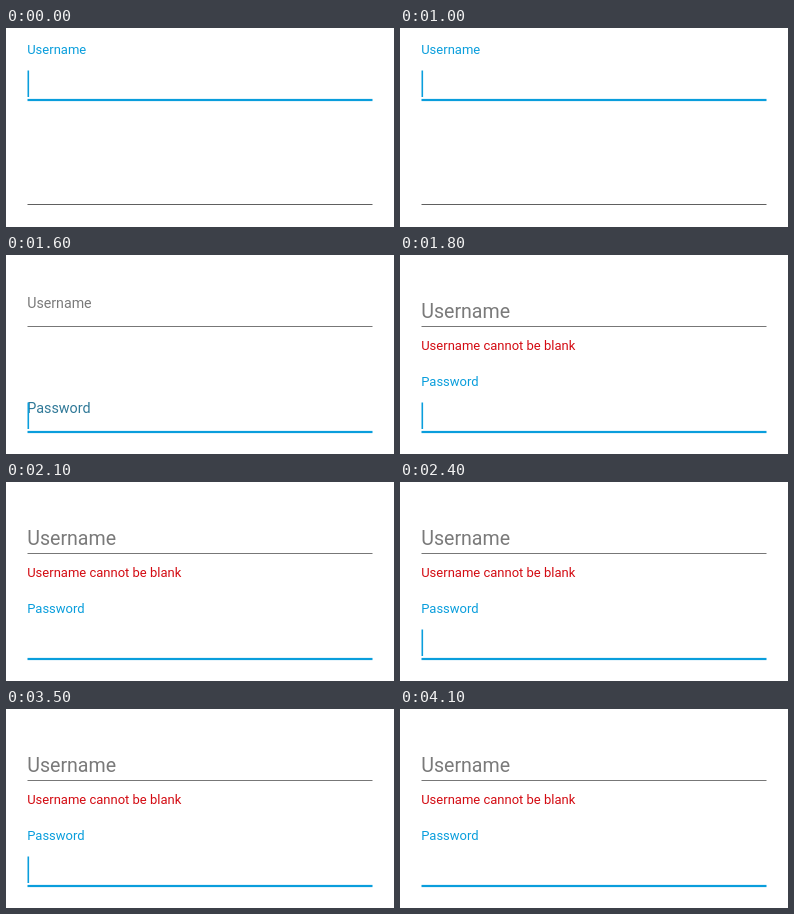
Animation of 388 by 199 pixels, one loop 4200 ms. Source, as an HTML page:

```html
<!DOCTYPE html>
<html lang="en">
<head>
<meta charset="utf-8">
<style>
html, body { margin: 0; width: 100%; height: 100%; overflow: hidden; background: #fff; }
svg { display: block; width: 388px; height: 199px; }
text { font-family: Roboto, sans-serif; font-size: 13px; }
</style>
</head>
<body>
<svg viewBox="0 0 388 199">
  <text id="user" x="21.2">Username</text>
  <rect id="userLine" x="21.5" width="345"/>
  <text id="error" x="21.2" y="94.6" fill="#d30b12">Username cannot be blank</text>
  <text id="pass" x="21.2">Password</text>
  <rect id="passLine" x="21.5" width="345"/>
  <rect id="caret" x="21.5" width="1.6" height="26.5" fill="#0a9edc"/>
</svg>
<script>
const LOOP = 4200, FOCUS = 1400, BLINK = 500;
const BLUE = [10, 158, 220], GREY = [122, 122, 122], DARK = [85, 85, 85];
const $ = id => document.getElementById(id);
const clamp = v => Math.max(0, Math.min(1, v));
const mix = (a, b, k) => a + (b - a) * k;
const rgb = (a, b, k) => `rgb(${a.map((v, i) => Math.round(mix(v, b[i], k)))})`;

function set(id, attrs) {
  for (const k in attrs) $(id).setAttribute(k, attrs[k]);
}

// Fast-out, slow-in: cubic-bezier(.4, 0, .2, 1)
function ease(x) {
  x = clamp(x);
  let lo = 0, hi = 1;
  for (let i = 0; i < 24; i++) {
    const s = (lo + hi) / 2, r = 1 - s;
    if (1.2 * r * r * s + 0.6 * r * s * s + s * s * s < x) lo = s; else hi = s;
  }
  return lo * lo * (3 - 2 * lo);
}

// up: 0 = large hint inside the field, 1 = small floating label
function label(id, top, up, fill) {
  const size = mix(19.6, 13, 1 - Math.pow(1 - up, 5.5));
  $(id).style.fontSize = size + 'px';
  set(id, { y: mix(top + 36.3, top, up), fill });
}

function underline(id, y, active) {
  set(id, active
    ? { y: y - 0.1, height: 2.2, fill: rgb(BLUE, BLUE, 0) }
    : { y, height: 1, fill: id === 'passLine' ? '#606060' : '#777' });
}

function draw(time) {
  const t = Math.floor((time % LOOP) / 100) * 100;
  const moved = t >= FOCUS;
  const userUp = 1 - ease((t - 1506) / 200);
  const passUp = ease((t - 1549) / 200);

  label('user', 26.4, userUp, rgb(moved ? GREY : BLUE, GREY, 0));
  label('pass', 131.1, passUp, rgb(DARK, BLUE, Math.sqrt(passUp)));
  set('pass', { opacity: moved ? 1 : 0 });
  set('error', { opacity: clamp((t - 1600) / 200) });

  underline('userLine', 71, !moved);
  underline('passLine', 176, moved);

  const since = moved ? t - FOCUS : t;
  const on = Math.floor(since / BLINK) % 2 === 0;
  set('caret', { y: moved ? 147.5 : 42.5, opacity: on ? 1 : 0 });
}

const start = performance.now();
function tick() {
  draw(performance.now() - start);
  requestAnimationFrame(tick);
}
tick();
</script>
</body>
</html>
```
